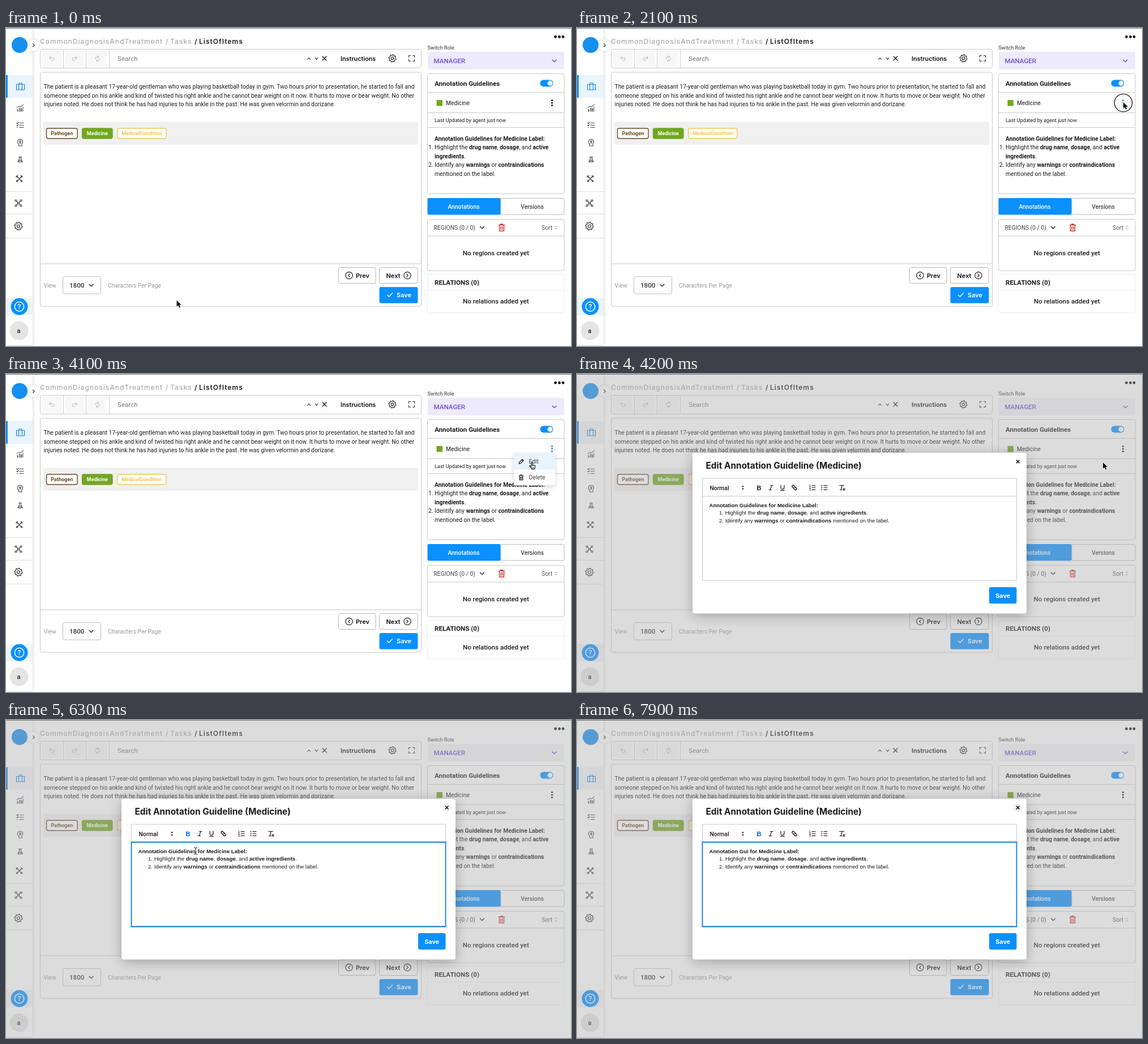
These frames come from a looping animation (998x561 px, 8 s). An HTML page with a canvas:

```html
<!DOCTYPE html>
<html lang="en">
<head>
<meta charset="utf-8">
<title>Annotation guideline editing</title>
<style>
html, body { margin: 0; width: 100%; height: 100%; overflow: hidden; background: #fff; }
canvas { display: block; width: 998px; height: 561px; }
</style>
</head>
<body>
<canvas id="stage" width="998" height="561"></canvas>
<script>
const g = document.getElementById('stage').getContext('2d');
const LOOP = 8000, STEP = 100;
const ROBOTO = 'Roboto, sans-serif', INTER = 'Inter, sans-serif', ARIAL = '"Liberation Sans", Arial, sans-serif';
const BLUE = '#0b90fd', INK = '#1c1c1c', GREY = '#c8c8c8', GREEN = '#71a71f', PURPLE = '#6a4fd0';
const BODY = 10.33, SMALL = 9.04, LARGE = 11.6;

const font = (size, weight = 400, family = ROBOTO) => `${weight} ${size}px ${family}`;

function text(str, x, y, f, color = INK, align = 'left', spacing = 0) {
  g.font = f;
  g.fillStyle = color;
  g.textAlign = align;
  g.letterSpacing = spacing + 'px';
  g.fillText(str, x, y);
  const w = g.measureText(str).width;
  g.letterSpacing = '0px';
  return w;
}

// Parts between asterisks are bold.
function rich(str, x, y, size, family, color = INK) {
  str.split('*').forEach((part, i) => {
    x += text(part, x, y, font(size, i % 2 ? 700 : 400, family), color);
  });
  return x;
}

function box(x, y, w, h, { r = 0, fill, line, lw = 1 } = {}) {
  g.beginPath();
  g.roundRect(x, y, w, h, r);
  if (fill) { g.fillStyle = fill; g.fill(); }
  if (line) { g.strokeStyle = line; g.lineWidth = lw; g.stroke(); }
}

function disc(x, y, r, fill, line, lw = 1.2) {
  g.beginPath();
  g.arc(x, y, r, 0, 7);
  if (fill) { g.fillStyle = fill; g.fill(); }
  if (line) { g.strokeStyle = line; g.lineWidth = lw; g.stroke(); }
}

function icon(d, x, y, color = '#444', lw = 1.2, fill) {
  const p = new Path2D(d);
  g.save();
  g.translate(x, y);
  g.lineCap = g.lineJoin = 'round';
  if (fill) { g.fillStyle = fill; g.fill(p); }
  if (lw) { g.strokeStyle = color; g.lineWidth = lw; g.stroke(p); }
  g.restore();
}

const hline = (x, y, w, color = GREY) => { g.fillStyle = color; g.fillRect(x, y, w, 1); };
const vline = (x, y, h, color = GREY) => { g.fillStyle = color; g.fillRect(x, y, 1, h); };

function shadow(blur, dy, color, draw) {
  g.save();
  g.shadowBlur = blur;
  g.shadowOffsetY = dy;
  g.shadowColor = color;
  draw();
  g.restore();
}

function gear(x, y, r, color) {
  g.beginPath();
  for (let i = 0; i < 32; i++) {
    const a = (i + 0.5) * Math.PI / 16, k = i % 4 < 2 ? r : r * 0.78;
    g.lineTo(x + k * Math.cos(a), y + k * Math.sin(a));
  }
  g.closePath();
  g.strokeStyle = color;
  g.lineWidth = 1.2;
  g.stroke();
  disc(x, y, r * 0.36, null, color);
}

const ICONS = {
  down: 'M-3.5 -1.8L0 1.8L3.5 -1.8',
  up: 'M-2.5 1.3L0 -1.3L2.5 1.3',
  left: 'M1.3 -2.6L-1.3 0L1.3 2.6',
  right: 'M-1.3 -2.6L1.3 0L-1.3 2.6',
  cross: 'M-3.5 -3.5L3.5 3.5M3.5 -3.5L-3.5 3.5',
  close: 'M-2.4 -2.4L2.4 2.4M2.4 -2.4L-2.4 2.4',
  check: 'M-4.5 0L-1.5 3L4.5 -3.5',
  undo: 'M-1.5 -4L-4 -1.5L-1.5 1M-4 -1.5H2Q4 -1.5 4 .8T2 3.2H0',
  redo: 'M1.5 -4L4 -1.5L1.5 1M4 -1.5H-2Q-4 -1.5 -4 .8T-2 3.2H0',
  reset: 'M-4 1Q-4 -3.5 0 -3.5H1.5M0 -5.2L2 -3.5L0 -1.8M4 -1Q4 3.5 0 3.5H-1.5M0 1.8L-2 3.5L0 5.2',
  expand: 'M-5 -2V-5H-2M2 -5H5V-2M5 2V5H2M-2 5H-5V2',
  trash: 'M-5 -4.5H5M-1.8 -4.5V-6H1.8V-4.5M-4 -4V6H4V-4M-1.4 -1.5V3.5M1.4 -1.5V3.5',
  sort: 'M-1.8 -1.2L0 -3.2L1.8 -1.2M-1.8 1.2L0 3.2L1.8 1.2',
  bag: 'M-7 -3.5H7V6H-7ZM-2.5 -3.5V-6H2.5V-3.5M-3 -3.5V6M3 -3.5V6',
  chart: 'M-5 6V2M-1.6 6V0M1.8 6V1M5 6V-2M-6 -.5L-2 -3L1 -2L5.5 -6M-4 6V3M3 6V1M0 6V0',
  list: 'M-6 -4L-5 -3L-3 -5M-6 0L-5 1L-3 -1M-5.5 4H-4.5M-1 -4H6M-1 0H6M-1 4H6',
  head: 'M-2.5 6V3Q-6 -.5 -4 -4Q0 -7.5 4 -4Q5.5 -1 3 2V6ZM0 -3.4L1.6 -1.6L0 .6L-1.6 -1.6ZM0 .6V2',
  flask: 'M-2.5 -4.5H2.5M-1.4 -4.5V-1L-4.2 4.2H4.2L1.4 -1V-4.5M-2.6 1.6H2.6',
  tools: 'M-5 -5L5 5M5 -5L-5 5M-5.5 -3L-3 -5.5M3 -5.5L5.5 -3M3 4.8L4.8 3M-4.8 3L-3 4.8',
  net: 'M0 0L-4.5 -4.5M0 0L4.5 -4.5M0 0L-4.5 4.5M0 0L4.5 4.5',
  pencil: 'M-4 4L-3.2 1L2 -4.2L4.2 -2L-1 3.2ZM.8 -3L3 -.8',
  link: 'M-.6 .8Q-2.6 .4 -4 -1.4Q-4.6 -4 -2 -4.2Q1 -3 1.8 -.6M.6 -.8Q2.6 -.4 4 1.4Q4.6 4 2 4.2Q-1 3 -1.8 .6',
  bullets: 'M-1 -3.6H5M-1 0H5M-1 3.6H5',
  arrow: 'M0 0V11L2.6 8.7L4.4 12.7L6.4 11.8L4.6 8H8.2Z',
  hand: 'M-1 0Q.2 -1 1 .2V4.4L4.8 5.2Q6 5.6 5.8 7L5 9.6V11.6H-.6V10L-4.2 6.4Q-3.8 4.8 -2.4 5.8L-1 7Z',
  beam: 'M-2.5 -6Q0 -6 0 -4.5Q0 -6 2.5 -6M0 -4.5V4.5M-2.5 6Q0 6 0 4.5Q0 6 2.5 6M-1.2 2H1.2'
};

function sidebar(pale) {
  shadow(5, 0, 'rgba(0,0,0,.22)', () => box(0, 0, 47, 559, { fill: '#fff' }));
  shadow(4, 0, 'rgba(0,0,0,.2)', () => disc(48.5, 30.5, 10.5, '#fff'));
  icon(ICONS.right, 49, 30.5, '#444', 1.4);
  disc(24, 30, 14, '#168ff0');
  box(0, 83, 47, 40, { fill: pale('#e9f4fd') });
  box(0, 83, 3, 40, { fill: BLUE });
  box(0, 476, 47, 31, { fill: pale('#eaf5fe') });
  icon(ICONS.bag, 25.5, 103, '#1686df');
  icon(ICONS.chart, 25, 141, '#666', 1.1);
  icon(ICONS.list, 25, 171.5);
  icon(ICONS.head, 25, 202, '#444', 1.1);
  icon(ICONS.flask, 25, 232);
  icon(ICONS.tools, 23.5, 266, '#444', 1.6);
  icon(ICONS.net, 22, 309);
  for (const [dx, dy] of [[-4.5, -4.5], [4.5, -4.5], [-4.5, 4.5], [4.5, 4.5], [0, 0]])
    disc(22 + dx, 309 + dy, 1.5, '#fff', '#333');
  gear(22, 349.5, 7, '#333');
  for (const y of [288, 328, 370]) hline(0, y, 47, '#ddd');
  disc(23.5, 491.5, 15, BLUE);
  disc(23.5, 491.5, 8.2, null, '#fff', 1.5);
  text('?', 23.5, 495.7, font(12, 500), '#fff', 'center');
  disc(23, 534, 16.5, '#e4e4e4');
  text('a', 22.5, 538, font(11, 500), INK, 'center');
}

function header() {
  const bread = font(12, 500, INTER);
  text('CommonDiagnosisAndTreatment', 60, 28, bread, '#aaa', 'left', 1);
  text('/', 282, 28, bread, '#aaa');
  text('Tasks', 290, 28, bread, '#aaa', 'left', 1);
  text('/', 333, 28, font(12, 600, INTER), INK);
  text('ListOfItems', 341, 28, font(12, 600, INTER), INK, 'left', 1);
  for (const x of [970.5, 977.5, 984]) disc(x, 15.5, 2.4, '#111');

  box(60.5, 37.5, 673, 33, { r: 3, line: GREY });
  ['undo', 'redo', 'reset'].forEach((name, i) => {
    const x = 81 + i * 40.3;
    box(x - 17, 40, 34, 27, { fill: '#f7f7f7' });
    icon(ICONS[name], x, 54, '#c4c4c4');
    vline([101, 141, 182][i], 38, 32, '#ccc');
  });
  text('Search', 197, 57.5, font(LARGE), '#777');
  icon(ICONS.up, 535, 54, '#333');
  icon('M-2.5 -1.3L0 1.3L2.5 -1.3', 548.5, 54, '#333');
  icon(ICONS.cross, 562.5, 53.5, INK, 1.4);
  text('Instructions', 591, 57.5, font(10.8, 600, INTER), '#111');
  gear(682.5, 53.5, 6.5, '#333');
  icon(ICONS.expand, 716.5, 53.5, '#333');
}

function button(label, x, y, w, labelX) {
  box(x, y, w, 28, { r: 3, line: '#b4b4b4' });
  text(label, labelX, y + 18, font(11, 600, INTER), '#111');
}

function chip(label, x, w, color, fill) {
  box(x, 177, w, 18, { r: 3, fill: fill || '#fff', line: color, lw: 1.4 });
  text(label, x + w / 2, 189, font(SMALL, 700), fill ? '#fff' : color, 'center');
}

function mainPanel() {
  box(60.5, 78, 673, 413, { r: 3, line: GREY });
  hline(61, 415.5, 672);
  [
    'The patient is a pleasant 17-year-old gentleman who was playing basketball today in gym. Two hours prior to presentation, he started to fall and',
    'someone stepped on his ankle and kind of twisted his right ankle and he cannot bear weight on it now. It hurts to move or bear weight. No other',
    'injuries noted. He does not think he has had injuries to his ankle in the past. He was given velormin and dorizane.'
  ].forEach((s, i) => text(s, 66.5, 107 + i * 15.5, font(BODY)));
  box(66, 165.5, 662, 40.5, { r: 2, fill: '#f0f0f0' });
  chip('Pathogen', 71.5, 54.5, '#6a4a20');
  chip('Medicine', 134.5, 53.5, GREEN, GREEN);
  chip('MedicalCondition', 196.8, 86, '#f4c752');

  text('View', 66.5, 457.5, font(BODY), '#999');
  box(100.5, 438.5, 67, 30.5, { r: 3, line: '#bdbdbd' });
  text('1800', 112, 458, font(LARGE, 500), '#333');
  icon(ICONS.down, 150.5, 454, '#333', 1.5);
  text('Characters Per Page', 180, 457.5, font(BODY), '#999');

  button('Prev', 587.5, 422.5, 65.5, 618);
  disc(606, 436.5, 6.2, null, INK);
  icon(ICONS.left, 606, 436.5, INK);
  button('Next', 659.5, 422.5, 67.5, 671.5);
  disc(709, 436.5, 6.2, null, INK);
  icon(ICONS.right, 709, 436.5, INK);
  box(659.5, 457, 68, 28.5, { r: 3, fill: BLUE });
  icon(ICONS.check, 678, 471, '#fff', 1.3);
  text('Save', 690, 475, font(11, 600, INTER), '#fff');
}

function sidePanel(dotColor, pale) {
  text('Switch Role', 744.5, 38, font(SMALL), '#333');
  box(745, 42, 241, 31, { r: 2, fill: pale('#eeeafd') });
  text('MANAGER', 755.5, 61.5, font(LARGE, 500), PURPLE);
  icon(ICONS.down, 968.5, 58, PURPLE, 1.5);

  box(744.5, 80.5, 241.5, 212, { r: 2, line: GREY });
  text('Annotation Guidelines', 757, 101.5, font(LARGE, 600));
  box(943.5, 91.5, 23, 12, { r: 6, fill: BLUE });
  disc(961, 97.5, 4.4, '#fff');
  hline(745, 113, 241);
  box(760.5, 127, 10.5, 10.5, { r: 1, fill: GREEN });
  text('Medicine', 777, 135.5, font(BODY));
  for (const y of [127.5, 132, 136.5]) disc(964.5, y, 1.6, dotColor);
  hline(745, 149, 241);
  text('Last Updated by agent just now', 757, 166, font(SMALL));
  hline(745, 175, 241);
  [
    '*Annotation Guidelines for Medicine Label:*',
    'Highlight the *drug name*, *dosage*, and *active*',
    '*ingredients*.',
    'Identify any *warnings* or *contraindications*',
    'mentioned on the label.'
  ].forEach((s, i) => rich(s, 757, 198.5 + i * 15.5, BODY, ROBOTO));
  text('1.', 746, 214, font(BODY));
  text('2.', 746, 245, font(BODY));

  box(874, 300.5, 112, 28.5, { r: 2, line: '#b8b8b8' });
  box(744.5, 300, 129, 29.5, { r: 2, fill: BLUE });
  text('Annotations', 808.5, 318.5, font(BODY, 500), '#fff', 'center');
  text('Versions', 929.5, 318.5, font(BODY, 500), '#444', 'center');

  box(744.5, 337.5, 241.5, 90.5, { r: 2, line: GREY });
  hline(745, 366.5, 241);
  text('REGIONS (0 / 0)', 755.5, 356, font(BODY), '#444');
  icon(ICONS.down, 841, 352, '#333', 1.5);
  icon(ICONS.trash, 875.5, 352, '#c9352b', 1.4);
  text('Sort', 946, 356, font(BODY), '#555');
  icon(ICONS.sort, 971.5, 352, '#999', 1);
  text('No regions created yet', 865.3, 401, font(LARGE, 500), INK, 'center');

  box(744.5, 434.5, 241.5, 68, { r: 2, line: '#ececec' });
  text('RELATIONS (0)', 757, 452.5, font(LARGE, 600));
  hline(745, 462, 241, '#ececec');
  text('No relations added yet', 865.3, 486, font(LARGE, 500), INK, 'center');
}

function menu(alpha, hover) {
  g.save();
  g.globalAlpha = alpha;
  shadow(6, 2, 'rgba(0,0,0,.2)', () => box(897, 140, 73, 56.5, { r: 2, fill: '#fff' }));
  if (hover) box(897, 140, 73, 28.5, { fill: '#e8f4fd' });
  icon(ICONS.pencil, 910, 154.5, '#222');
  text('Edit', 923.5, 158, font(BODY), '#444');
  g.save();
  g.translate(910, 182.5);
  g.scale(.72, .72);
  icon(ICONS.trash, 0, 0, '#222', 1.7);
  g.restore();
  text('Delete', 923.5, 186, font(BODY), '#444');
  g.restore();
}

function editorTools(focused) {
  text('Normal', 234.5, 204.5, font(BODY, 500));
  icon('M-2.2 -1.2L0 -3.8L2.2 -1.2ZM-2.2 1.2L0 3.8L2.2 1.2Z', 293, 200.5, INK, 0, INK);
  text('B', 321.5, 204.5, font(11.5, 700, ARIAL), focused ? '#06c' : INK, 'center');
  icon('M-1 -4H3.5M-3.5 4H1M1.4 -4L-1.4 4', 342.5, 200.5, INK);
  icon('M-3 -4.5V-.5Q-3 2.6 0 2.6T3 -.5V-4.5M-3.5 4.8H3.5', 363, 200.5, INK);
  icon(ICONS.link, 384, 200.5, INK, 1.4);
  icon(ICONS.bullets, 416, 200.5, INK);
  ['1', '2', '3'].forEach((n, i) => text(n, 411.5, 198.6 + i * 3.6, font(4.5, 700), INK, 'center'));
  icon(ICONS.bullets, 437, 200.5, INK);
  for (const y of [-3.6, 0, 3.6]) disc(432.5, 200.5 + y, 1, INK);
  icon('M-4.5 -4H3.5M.2 -4L-1.8 4M-3.5 4H0M2 1.5L5 4.5M5 1.5L2 4.5', 468, 200.5, INK);
}

function modal(t) {
  const focused = t >= 6200;
  g.fillStyle = 'rgba(172,172,174,.42)';
  g.fillRect(0, 0, 998, 561);
  shadow(22, 4, 'rgba(0,0,0,.26)', () => box(204, 139, 590, 283.5, { r: 4, fill: '#fff' }));
  text('Edit Annotation Guideline (Medicine)', 227.5, 166.5, font(15.4, 700, INTER));
  if (t >= 4500) disc(778.5, 154.5, 8, '#f1f1f1');
  icon(ICONS.close, 778.7, 154.5, '#111', 1.5);
  box(221.5, 184, 555, 180, { line: GREY });
  hline(222, 215, 554);
  editorTools(focused);
  if (focused) box(221.5, 215.5, 555, 149, { line: '#0b7be0', lw: 1.8 });

  const word = 'Guidelines';
  const left = t < 6800 ? 10 : t < 7000 ? 9 : t < 7600 ? 8 : 3;
  const typed = 'Annotation ' + word.slice(0, left);
  const size = 9.6;
  rich(`*${typed} for Medicine Label:*`, 233.5, 234.5, size, ARIAL);
  rich('1. Highlight the *drug name*, *dosage*, and *active ingredients*.', 251, 248.2, size, ARIAL);
  rich('2. Identify any *warnings* or *contraindications* mentioned on the label.', 251, 261.9, size, ARIAL);
  if (t >= 6800 && t < 7900) {
    g.font = font(size, 700, ARIAL);
    vline(Math.round(233.5 + g.measureText(typed).width) - 0.5, 226, 11, '#111');
  }
  box(728, 376, 48.5, 29, { r: 3, fill: BLUE });
  text('Save', 752.2, 394.5, font(10.8, 700, INTER), '#fff', 'center');
}

// Pointer moves: start time, end time, target x, target y.
const MOVES = [
  [400, 900, 857, 207], [1100, 1800, 965, 131], [3200, 3600, 929, 156],
  [4600, 4800, 476, 249], [4900, 5100, 330.5, 228.5], [5200, 6100, 335, 231]
];
const CLICKS = [2100, 4000, 6200];

function pointerAt(t) {
  let x = 301.5, y = 480.5;
  for (const [from, to, tx, ty] of MOVES) {
    const u = Math.min(1, Math.max(0, (t - from) / (to - from)));
    const e = u * u * (3 - 2 * u);
    x += (tx - x) * e;
    y += (ty - y) * e;
  }
  return { x, y };
}

function pointer(t, { x, y }, overMenu) {
  if (CLICKS.some(c => t >= c && t < c + STEP)) disc(x, y + 1, 15.7, null, '#111', 1.3);
  if (t >= 6800) return;
  if ((t >= 900 && t < 1200) || t >= 4800) {
    icon(ICONS.beam, x, y, '#fff', 2);
    icon(ICONS.beam, x, y, '#111', 1);
  } else if (overMenu) {
    icon(ICONS.hand, x, y, '#111', 1.1, '#fff');
    icon('M1 5.5V4.4M2.8 6V4.8M.8 8V10M2.6 8V10', x, y, '#111', .8);
  } else {
    icon(ICONS.arrow, x, y, '#fff', 1.6);
    icon(ICONS.arrow, x, y, '#111', 0, '#111');
  }
}

function draw(t) {
  const p = pointerAt(t);
  const editing = t >= 4200;
  const menuOpen = t >= 2200 && !editing;
  const overMenu = menuOpen && p.y > 140 && p.x < 970;
  // Light tints turn neutral behind the dialog.
  const pale = color => editing ? '#f3f3f5' : color;
  g.fillStyle = '#fff';
  g.fillRect(0, 0, 998, 561);
  sidebar(pale);
  header();
  mainPanel();
  sidePanel(t >= 1800 && !editing ? '#1a8fd8' : INK, pale);
  if (menuOpen) menu(t < 2300 ? 0.6 : 1, overMenu);
  if (editing) modal(t);
  pointer(t, p, overMenu);
  hline(0, 0, 998, '#777');
}

let shown = -1;
function tick() {
  const t = Math.floor(performance.now() % LOOP / STEP) * STEP;
  if (t !== shown) draw(shown = t);
  requestAnimationFrame(tick);
}
tick();
</script>
</body>
</html>
```
